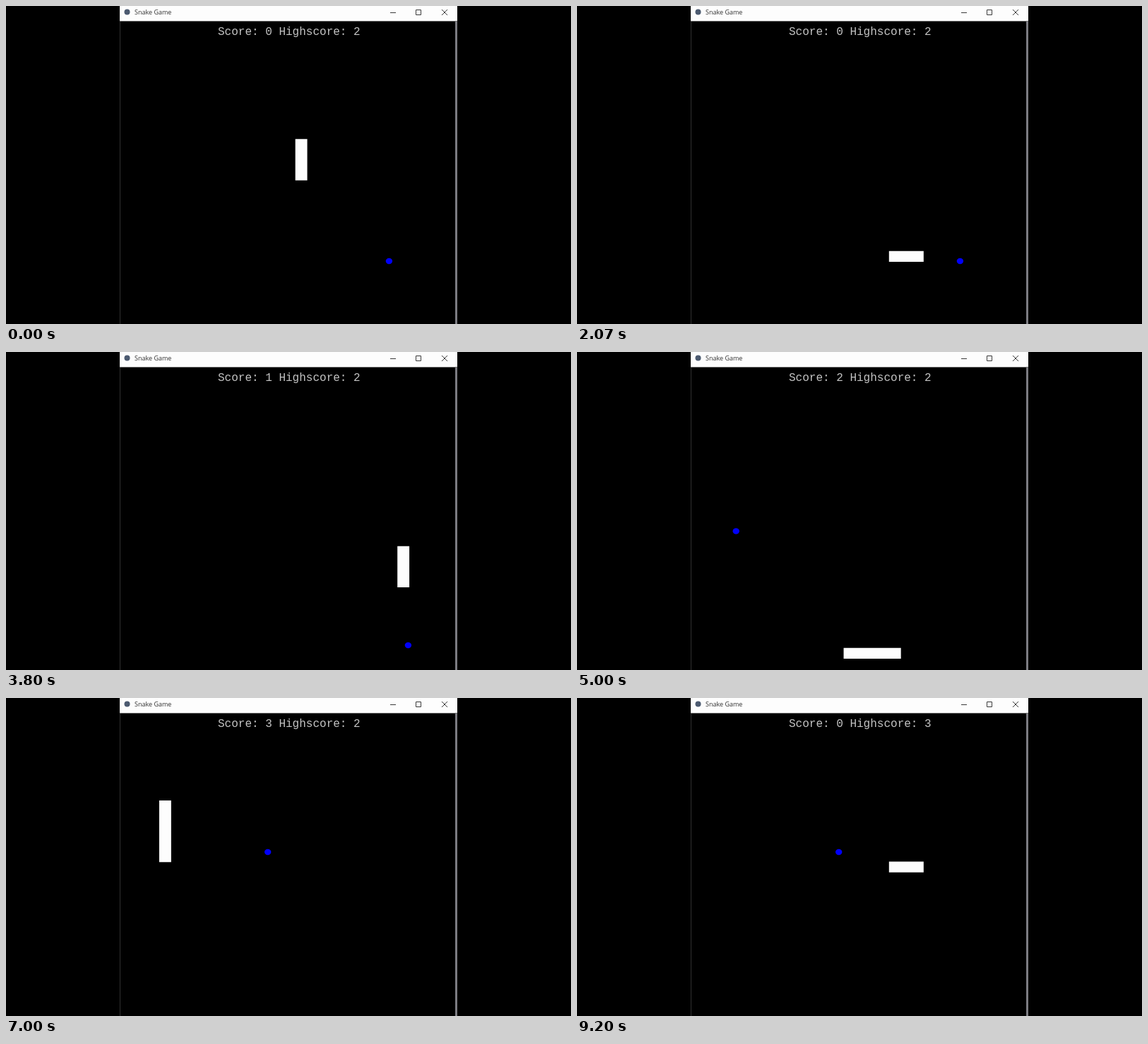
An HTML page that plays this animation: 800x450 px, repeating every 9270 ms.

```html
<!DOCTYPE html>
<html lang="en">
<head>
<meta charset="utf-8">
<title>Snake Game</title>
<style>
  html, body { margin: 0; width: 100%; height: 100%; overflow: hidden; background: #000; }
  svg { display: block; width: 100vw; height: 100vh; }
  .title { font: 9px "Open Sans", "Noto Sans", sans-serif; fill: #303030; }
  .score { font: 16px "Liberation Mono", "Courier New", monospace; fill: #c4c4c4; white-space: pre; }
  .icons { fill: none; stroke: #3a3a3a; stroke-width: 1; }
</style>
</head>
<body>
<svg viewBox="0 0 800 450">
  <defs><clipPath id="board"><rect x="162" y="22" width="474" height="428"/></clipPath></defs>
  <rect width="800" height="450" fill="#000"/>
  <rect x="161" width="478" height="21" fill="#fdfdfd"/>
  <rect x="161" y="21" width="478" height="1" fill="#707070"/>
  <rect x="161" y="22" width="1" height="428" fill="#303030"/>
  <rect x="636" y="22" width="3" height="428" fill="#7c7c82"/>
  <circle cx="171.5" cy="8.5" r="4" fill="#4c5a70"/>
  <text class="title" x="182" y="12">Snake Game</text>
  <path class="icons" d="M544 9.5h8M580.5 5.5h7v7h-7zM617 5l8 8M625 5l-8 8"/>
  <text class="score" id="score" x="300" y="41"></text>
  <g clip-path="url(#board)">
    <ellipse id="food" rx="4.7" ry="4.2" fill="#0000fa"/>
    <path id="snake" fill="#fdfdfd"/>
  </g>
</svg>
<script>
const LOOP = 9270, TICKS = 139;
const DIRS = { U: [0, 20], D: [0, -20], L: [-20, 0], R: [20, 0], W: [0, 0] };
// Direction and number of ticks; W waits, X starts a new game.
const ROUTE = 'U8 R2 D19 R9 U9 L2 W1 D14 L21 W1 U19 R2 W1 R23 W1 X1 R5';
const FOODS = [[0, 542.4, 361], [35, 569.4, 415], [63, 225.2, 253.5], [98, 370.7, 218]];

const $ = id => document.getElementById(id);
const eaten = tick => FOODS.filter(f => f[0] <= tick).length - 1;
const tickStart = n => Math.round(n * 20 / 3) * 10;

function cellPath([x, y]) {
  const left = 393.6 + 0.803 * x, top = 231.5 - 0.72 * y;
  return `M${left} ${top}h16.9v15.2h-16.9z`;
}

function play() {
  let body = [[20, 60], [20, 40], [20, 20], [20, 0]];
  let resetAt = Infinity;
  const states = [];
  const save = () => {
    const tick = states.length, points = eaten(tick), over = tick >= resetAt;
    states.push({
      snake: body.map(cellPath).join(''),
      food: FOODS[points],
      score: `Score: ${over ? 0 : points} Highscore: ${over ? 3 : 2}`
    });
  };
  save();
  for (const run of ROUTE.split(' ')) {
    const dir = run[0];
    for (let i = 0; i < +run.slice(1); i++) {
      const tick = states.length;
      if (dir === 'X') {
        body = [[0, 0], [-20, 0], [-40, 0]];
        resetAt = tick;
      } else if (dir !== 'W') {
        const [dx, dy] = DIRS[dir], [x, y] = body[0];
        const size = 3 + (tick > resetAt ? 0 : eaten(tick - 1));
        body = [[x + dx, y + dy], ...body].slice(0, size);
      }
      save();
    }
  }
  return states;
}

const states = play();
let shown = -1;

function draw(now) {
  const t = now % LOOP;
  let tick = Math.min(TICKS - 1, Math.floor(t * 0.015 + 0.06));
  if (t < tickStart(tick)) tick--;
  if (tick !== shown) {
    const { snake, food, score } = states[tick];
    $('snake').setAttribute('d', snake);
    $('food').setAttribute('cx', food[1]);
    $('food').setAttribute('cy', food[2]);
    $('score').textContent = score;
    shown = tick;
  }
}

const start = performance.now();
function loop() {
  draw(performance.now() - start);
  requestAnimationFrame(loop);
}
loop();
</script>
</body>
</html>
```
